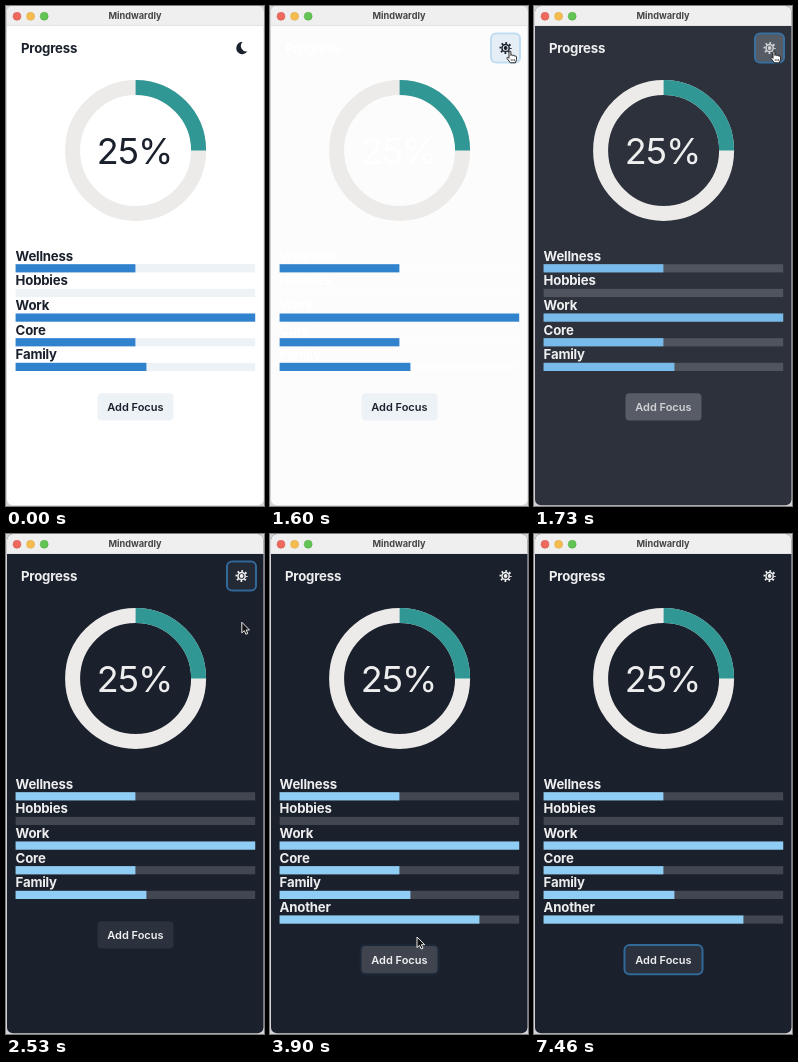
An HTML page that plays this animation: 258 by 500 pixels, repeating every 8.09 s.

```html
<!DOCTYPE html>
<html lang="en">
<head>
<meta charset="utf-8">
<title>Progress</title>
<style>
html, body { margin: 0; width: 100%; height: 100%; overflow: hidden; background: #d2d2d2; }
svg { display: block; font-family: Inter, "Open Sans", sans-serif; }
.mid { text-anchor: middle; }
.label { font-size: 13.2px; font-weight: 650; letter-spacing: -.2px; }
</style>
</head>
<body>
<svg width="258" height="500" viewBox="0 0 258 500">
  <clipPath id="win"><rect x="1" width="256.5" height="499.3" rx="6"/></clipPath>
  <g clip-path="url(#win)">
    <rect id="page" width="258" height="500"/>
    <rect width="258" height="20" fill="#f0eff0"/>
    <rect y="19.5" width="258" height=".5" fill="#d4d3d4"/>
    <g stroke-width=".5">
      <circle cx="11" cy="10.3" r="4" fill="#ee6a5f" stroke="#d0574d"/>
      <circle cx="24.6" cy="10.3" r="4" fill="#f5bd4f" stroke="#d6a243"/>
      <circle cx="38.2" cy="10.3" r="4" fill="#61c454" stroke="#52a842"/>
    </g>
    <text class="mid" x="129" y="13.3" font-size="9.2" font-weight="650" fill="#454545">Mindwardly</text>

    <rect id="gearBtn" x="222" y="28.5" width="27" height="27" rx="4"/>
    <rect id="gearRing" x="221" y="27.5" width="29" height="29" rx="5" fill="none" stroke="#4299e1" stroke-width="2"/>
    <path id="moon" d="M236.6 36.1A6 6 0 1 0 241.4 45.3A5.4 5.4 0 0 1 236.6 36.1Z" fill="#1a202c"/>
    <g id="sun" transform="translate(235.6 42)" fill="none">
      <circle r="5.1" stroke-width="2" stroke-dasharray="1.7 2.306" stroke-dashoffset=".85"/>
      <circle r="3.6" stroke-width="1.5"/>
      <circle r=".95" stroke-width="1.9"/>
    </g>

    <g fill="none" stroke-width="15">
      <circle cx="129.6" cy="144.4" r="63" stroke="#edebe9"/>
      <path d="M129.6 81.4A63 63 0 0 1 192.6 144.4" stroke="#319795"/>
    </g>
    <g id="ink">
      <text class="label" x="15" y="46.6">Progress</text>
      <text class="mid" x="128.6" y="158.3" font-size="36" letter-spacing="-1">25%</text>
    </g>
    <g id="rows"></g>
    <g id="add">
      <rect id="addBtn" x="91.5" y="387.3" width="76" height="27.3" rx="4"/>
      <rect id="addRing" x="90.5" y="386.3" width="78" height="29.3" rx="5" fill="none" stroke="#4299e1" stroke-width="2"/>
      <text id="addText" class="mid" x="129.4" y="405" font-size="11" font-weight="600">Add Focus</text>
    </g>
  </g>
  <g id="arrow"><path d="M0 0V10.6L2.5 8.4L4.1 12L6 11.2L4.4 7.7H7.7Z" fill="#111" stroke="#fff" stroke-width=".9"/></g>
  <g id="hand"><path d="M0 1C0-.3 1.9-.3 1.9 1V4.4C2.2 3.6 3.7 3.7 3.8 4.7C4.4 4 5.6 4.2 5.7 5.2C6.6 4.7 7.5 5.2 7.5 6.2V8.6L6.4 11.8H1.4L-2 7.5C-2.4 6.5-1.3 6-.6 6.7L0 7.3Z" fill="#fff" stroke="#111" stroke-width=".9"/><path d="M2.2 8V10M3.9 8V10M5.5 8V10" stroke="#111" stroke-width=".6"/></g>
</svg>
<script>
const LOOP = 8090, TOGGLE = 1600, ADDED = 3900, STEP = 24.65;
const $ = id => document.getElementById(id);
const clamp = x => Math.max(0, Math.min(1, x));
const ramp = (t, start, length) => clamp((t - start) / length);
const easeOut = x => 1 - (1 - x) ** 2.4;
const smooth = x => x * x * (3 - 2 * x);
const lerp = (a, b, p) => a + (b - a) * p;

// blend [r, g, b, alpha] colours the way CSS does, premultiplied
function blend(a, b, p) {
  const alpha = lerp(a[3], b[3], p);
  const rgb = [0, 1, 2].map(i => alpha ? lerp(a[i] * a[3], b[i] * b[3], p) / alpha : 0);
  return `rgba(${rgb},${alpha})`;
}
const white = alpha => [255, 255, 255, alpha];
const DARK = [26, 32, 44, 1], GRAY = [237, 242, 247, 1];
const BLUE = [49, 130, 206, 1], SKY = [144, 205, 244, 1];

const items = [["Wellness", .5], ["Hobbies", 0], ["Work", 1], ["Core", .5], ["Family", .546], ["Another", .834]];
$("rows").innerHTML = items.map(([name, part], i) => `<g transform="translate(9.6 ${258.2 + i * STEP})">
  <text class="label" y="-3.4">${name}</text>
  <rect class="track" width="239.6" height="8.2"/>
  <rect class="bar" width="${239.6 * part}" height="8.2"/></g>`).join("");
const rows = $("rows").children;
const all = name => document.querySelectorAll("#rows ." + name);
const tracks = all("track"), bars = all("bar");

// time, x, y of the pointer tip
const path = [[300, 262, 190], [440, 238, 165], [1000, 239, 45], [2230, 239, 45], [3030, 229, 181],
  [3200, 229, 181], [3750, 147, 403], [3930, 147, 403], [4440, 152, 501]];

function pointer(t) {
  const i = path.findIndex(k => k[0] > t);
  if (i < 1) return null;
  const [t0, x0, y0] = path[i - 1], [t1, x1, y1] = path[i];
  const p = smooth(ramp(t, t0, t1 - t0));
  return [lerp(x0, x1, p), lerp(y0, y1, p)];
}

function draw(t) {
  const dark = t >= TOGGLE, added = t >= ADDED;
  const fade = length => easeOut(ramp(t, TOGGLE, length));
  const btn = fade(240);

  $("page").setAttribute("fill", blend(white(1), DARK, fade(200)));
  $("ink").setAttribute("fill", dark ? "rgba(255,255,255,.92)" : "#1a202c");
  $("rows").setAttribute("fill", dark ? "rgba(255,255,255,.92)" : "#1a202c");
  tracks.forEach(e => e.setAttribute("fill", dark ? "rgba(255,255,255,.17)" : "#edf2f7"));
  bars.forEach(e => e.setAttribute("fill", blend(BLUE, SKY, fade(300))));
  rows[5].setAttribute("visibility", added ? "visible" : "hidden");

  $("moon").setAttribute("visibility", dark ? "hidden" : "visible");
  $("sun").setAttribute("visibility", dark ? "visible" : "hidden");
  $("sun").setAttribute("stroke", blend(DARK, white(.92), btn));
  $("gearBtn").setAttribute("fill", blend([229, 237, 245, 1], white(.08), btn));
  $("gearBtn").setAttribute("opacity", ramp(t, 780, 150) * (1 - ramp(t, 2440, 200)));
  $("gearRing").setAttribute("opacity", .6 * ramp(t, 1520, 150) * (1 - ramp(t, 2860, 200)));

  const hover = ramp(t, 3640, 150) * (1 - ramp(t, ADDED, 200));
  $("addBtn").setAttribute("fill", blend(GRAY, white(.08 + .08 * hover), btn));
  $("addText").setAttribute("fill", blend(DARK, white(.92), btn));
  $("addRing").setAttribute("opacity", .6 * ramp(t, 3880, 200));
  $("add").setAttribute("transform", `translate(0 ${added ? STEP : 0})`);

  const at = pointer(t);
  const overGear = at && at[0] < 250 && at[1] < 57;
  const overAdd = at && !added && at[1] > 387;
  const shape = !at ? "" : overGear || overAdd ? "hand" : "arrow";
  for (const id of ["arrow", "hand"]) {
    $(id).setAttribute("visibility", id === shape ? "visible" : "hidden");
    if (at) $(id).setAttribute("transform", `translate(${at})`);
  }
}

const begin = performance.now();
function frame(now) {
  draw(Math.max(0, now - begin) % LOOP);
  requestAnimationFrame(frame);
}
draw(0);
requestAnimationFrame(frame);
</script>
</body>
</html>
```
